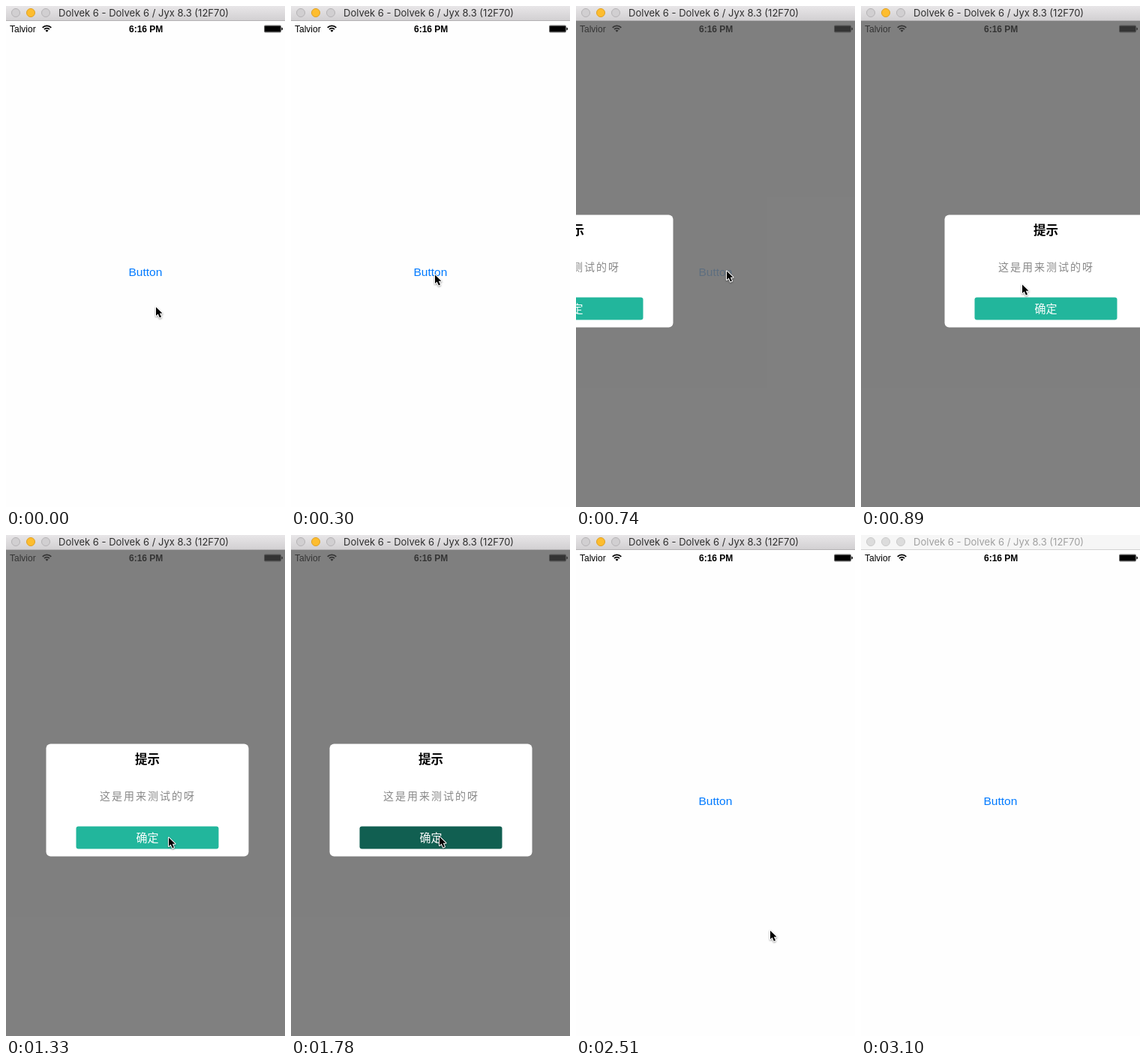
An HTML page for the animation above (3130 ms loop, 372 by 668 pixels).

```html
<!DOCTYPE html>
<html lang="en">
<head>
<meta charset="utf-8">
<title>Alert dialog demo</title>
<style>
  html, body { margin: 0; width: 100%; height: 100%; overflow: hidden; background: #fefefe; }
  svg { display: block; }
  .bar-title { font: 13px Inter, sans-serif; fill: #2e2e2e; }
  .status { font: 12px "Liberation Sans", Arial, sans-serif; }
  .clock { font-weight: bold; }
  .link { font: 15.5px "Liberation Sans", Arial, sans-serif; fill: #007aff; }
  .dialog text { font-family: "Noto Sans CJK SC", "Noto Sans CJK", sans-serif; text-anchor: middle; }
  .heading { font-size: 16.5px; font-weight: 700; }
  .message { font-size: 14px; letter-spacing: 2px; fill: #888; }
  .confirm { font-size: 15px; fill: #fff; }
  .light { fill: #d1cfd1; stroke: #b5b3b5; }
  .minimize { fill: #fdbd2f; stroke: #dfa023; }
  .inactive .bar { fill: #f6f6f6; }
  .inactive .edge { fill: #d2d2d2; }
  .inactive .light { fill: #dcdcdc; stroke: #cacaca; }
  .inactive .bar-title { fill: #a0a0a0; }
  .cursor path { stroke: #fff; stroke-width: 2; stroke-linejoin: round; paint-order: stroke; }
  .cursor { filter: drop-shadow(0 1px 1px rgba(0, 0, 0, .4)); }
</style>
</head>
<body>
<svg width="372" height="668" viewBox="0 0 372 668">
  <defs>
    <linearGradient id="chrome" x2="0" y2="1">
      <stop stop-color="#e8e6e8"/>
      <stop offset="1" stop-color="#d1cfd1"/>
    </linearGradient>
  </defs>
  <rect width="372" height="668" fill="#fefefe"/>

  <text class="status" x="5" y="35">Talvior</text>
  <g fill="none" stroke="#000" stroke-width="1.8">
    <path d="M48.7 28.8a8.2 8.2 0 0 1 11.6 0"/>
    <path d="M51 31.2a5 5 0 0 1 7 0"/>
    <path d="M54.5 34.8l-2-2.1a2.9 2.9 0 0 1 4 0z" fill="#000" stroke="none"/>
  </g>
  <text class="status clock" x="164" y="35">6:16 PM</text>
  <rect x="344.5" y="26" width="22" height="9" rx="1" fill="none" stroke="#777"/>
  <rect x="345" y="26.5" width="21" height="8" rx=".5"/>
  <path d="M367.3 28.5a1.7 2 0 0 1 0 4z"/>

  <text class="link" id="link" x="163.5" y="359.5">Button</text>
  <rect id="shade" y="20" width="372" height="648" fill="#4a4a4a" fill-opacity=".7"/>

  <g class="dialog" id="dialog">
    <rect y="278.5" width="270" height="150" rx="6" fill="#fff"/>
    <text class="heading" x="135" y="304.5">提示</text>
    <text class="message" x="135.5" y="352.5">这是用来测试的呀</text>
    <rect id="confirm" x="40" y="388.5" width="190" height="30" rx="3"/>
    <text class="confirm" x="135" y="409">确定</text>
  </g>

  <g id="titlebar">
    <rect class="bar" width="372" height="20" fill="url(#chrome)"/>
    <rect class="edge" y="19" width="372" height="1" fill="#b3b1b3"/>
    <circle class="light" cx="13" cy="9" r="5.5"/>
    <circle class="light minimize" cx="33" cy="9" r="5.5"/>
    <circle class="light" cx="53" cy="9" r="5.5"/>
    <text class="bar-title" x="70" y="14">Dolvek 6 - Dolvek 6 / Jyx 8.3 (12F70)</text>
  </g>

  <g class="cursor" id="cursor">
    <path d="M1 1.5V13L3.7 10.5 5.9 15.5 8 14.6 5.8 9.7H9.5Z"/>
  </g>
</svg>
<script>
  const DURATION = 3130;
  const HIDDEN = null;

  // Each step changes only the listed properties and holds until the next.
  const steps = [
    [0, { cursor: [199, 400], dialog: HIDDEN, link: 1, pressed: false, active: true }],
    [150, { cursor: [213, 383] }],
    [300, { cursor: [191, 357] }],
    [450, { cursor: [182, 347] }],
    [600, { link: .2 }],
    [740, { cursor: [200, 352], dialog: -140.5, link: .45 }],
    [890, { cursor: [214, 370], dialog: 111.5 }],
    [1040, { cursor: [230, 390], dialog: 46.5 }],
    [1190, { cursor: [236, 405] }],
    [1330, { cursor: [216, 402], dialog: 53.5 }],
    [1480, { cursor: [197, 401], dialog: 51.5 }],
    [1780, { pressed: true }],
    [1930, { dialog: HIDDEN, link: 1, pressed: false }],
    [2080, { cursor: [204, 401] }],
    [2220, { cursor: [206, 401] }],
    [2370, { cursor: [235, 433] }],
    [2510, { cursor: [258, 526] }],
    [2660, { cursor: [313, 635] }],
    [2810, { cursor: [342, 664] }],
    [2950, { cursor: HIDDEN }],
    [3100, { active: false }]
  ];

  const el = id => document.getElementById(id);
  const show = (node, visible) => node.setAttribute("visibility", visible ? "visible" : "hidden");
  const move = (node, x, y) => node.setAttribute("transform", `translate(${x} ${y})`);

  function stateAt(time) {
    return Object.assign({}, ...steps.filter(([start]) => start <= time).map(([, change]) => change));
  }

  function render(time) {
    const { cursor, dialog, link, pressed, active } = stateAt(time);
    show(el("cursor"), cursor !== HIDDEN);
    if (cursor) move(el("cursor"), ...cursor);
    show(el("shade"), dialog !== HIDDEN);
    show(el("dialog"), dialog !== HIDDEN);
    if (dialog !== HIDDEN) move(el("dialog"), dialog, 0);
    el("link").setAttribute("opacity", link);
    el("confirm").setAttribute("fill", pressed ? "#115f51" : "#22b69c");
    el("titlebar").setAttribute("class", active ? "" : "inactive");
  }

  const origin = performance.now();
  function tick() {
    render((performance.now() - origin) % DURATION);
    requestAnimationFrame(tick);
  }
  tick();
</script>
</body>
</html>
```
